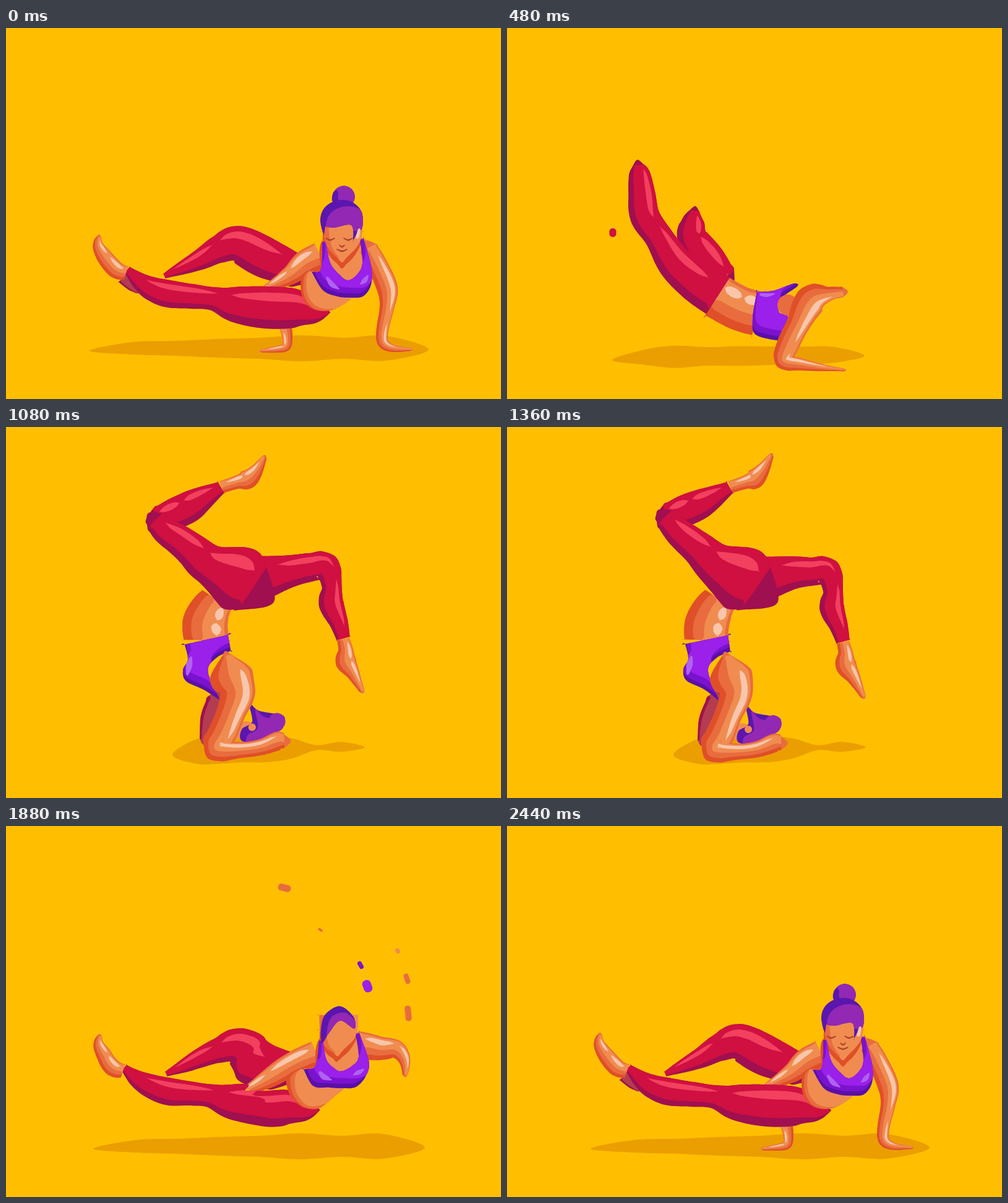
Animation, 800 px wide and 600 px high, one loop 2480 ms. Source, as an HTML page:

```html
<!DOCTYPE html>
<html lang="en">
<head>
<meta charset="utf-8">
<title>Yoga flow</title>
<style>
html, body { margin: 0; width: 100%; height: 100%; overflow: hidden; background: #ffbf00; }
svg { display: block; width: 100vw; height: 100vh; }
</style>
</head>
<body>
<svg id="stage" viewBox="0 0 800 600"></svg>
<script>
const LOOP = 2480, STEP = 40, CX = 390, CY = 330;

const INK = {
  red: '#cf1041', pink: '#f2405e', plum: '#a00f50',
  skin: '#e86c3e', peach: '#f08c50', rust: '#df4f28', shine: '#f9c6ac', far: '#b33c50', line: '#a8402c',
  violet: '#7a12ce', bright: '#9a20ea', deep: '#5a0fa8', gloss: '#af62f0', hair: '#5a16ae', mauve: '#9228b4'
};

// bands: ink and range across a limb (-1 lit edge, 1 dark edge); gloss: streaks along it;
// shifts: ink and offset of copies of a free outline, clipped to it
const LOOK = {
  legging: { base: 'plum', bands: [['red', -1.4, .58]], gloss: 'pink' },
  flesh: { base: 'skin', bands: [['rust', .6, 1.4], ['peach', -.85, .1]], gloss: 'shine' },
  far: { base: 'far', bands: [['plum', .7, 1.4]] },
  face: { base: 'peach', bands: [['skin', .7, 1.4]] },
  torso: { base: 'rust', shifts: [['skin', 4, 0], ['peach', 9, -3]] },
  bra: { base: 'deep', shifts: [['violet', 0, -7], ['bright', 5, -16]] },
  hair: { base: 'hair', shifts: [['mauve', 9, 10]] }
};

const arc = (x, y, w) => `${x - w},${y},.8 ${x},${y + 3},1.2 ${x + w},${y},.8`;

// Limb: look, ends (f flat, r round) with lit side, spine "x,y,radius".
// Free outline: look, '', "x,y" with "!" at sharp corners. Last entry: only while whole or forming.
const POSES = {
  A: [
    ['flesh', 'fr-', '452,484,10 455,503,8 452,516,7 435,520,5 413,522,2.5', 'whole'],
    ['far', 'fr+', '188,404,9 203,417,8 213,427,3', 'whole'],
    ['legging', 'fr+', '256,401,4 285,388,11 315,374,17 346,357,23 375,350,30 420,372,33 475,395,25'],
    ['flesh', 'fr-', '508,368,22 484,380,21 462,398,16 438,412,10 420,420,5'],
    ['legging', 'fr+', '196,391,6 225,416,17 258,429,22 300,434,20 335,438,19 370,447,29 420,452,34 470,454,31 500,462,16 521,460,3'],
    ['flesh', 'fr-', '194,396,11 178,391,14 160,371,13 149,352,9 150,338,4'],
    ['torso', '', '478,402 490,392 505,400 530,428 557,435 545,447 523,457 500,456 485,446 477,428'],
    ['torso', '', '510,346 543,352 578,340 584,365 590,395 570,415 530,410 510,390'],
    ['flesh', 'rr+', '586,356,14 599,380,16 616,420,17 616,450,12 609,485,10 609,508,9 625,518,6 655,520,2', 'whole'],
    ['flesh', 'fr+', '578,361,23 605,361,18 630,361,15 644,378,10 646,403,4', 'forming'],
    ['rust', 'fr+', '543,330,31 543,350,30 543,370,19 543,382,7'],
    ['bra', '', '511,346! 517,347! 524,380 540,400 553,408 568,398 576,380 572,342! 578,341! 590,385 590,415 577,434 555,436 535,434 512,424 494,394! 509,390'],
    ['gloss', 'rr+', '519,404,2 527,415,4 538,422,1'],
    ['gloss', 'rr+', '573,414,1 580,408,4 585,400,1'],
    ['face', 'fr+', '544,315,32 544,335,31 543,355,23 543,372,7'],
    ...[[524, 340, 7], [553, 340, 7], [543, 351, 4], [543, 358, 8]].map(a => ['line', 'rr+', arc(...a), 'whole']),
    ['mauve', 'rr+', '546,273,18', 'whole'],
    ['hair', 'rr+', '533,266,4 532,278,5 541,287,4', 'whole'],
    ['hair', '', '510,324 508,308 513,293 526,282 545,278 562,283 575,298 576,322 566,335 561,344! 558,319 530,323 516,321! 514,335!', 'whole'],
    ['shine', 'rr+', '571,326,2 568,338,3', 'whole'],
    ['hair', '', '516,350 514,330 522,320 546,313 568,320 570,334 546,336 528,340', 'forming']
  ],
  L: [
    ['legging', 'rr+', '303,296,8 300,314,19 300,340,25 325,375,28 350,405,22'],
    ['flesh', 'ff+', '338,433,36 375,453,36 406,462,36'],
    ['legging', 'rf+', '212,222,9 214,235,17 218,270,22 223,305,24 245,338,23 272,380,29 308,412,33 341,433,35'],
    ['bra', '', '404,427! 430,425 455,416 466,413 469,418 440,440 440,460 454,467 440,506! 402,496 397,470'],
    ['gloss', 'rr+', '410,431,2 420,432,3 432,430,1'],
    ['flesh', 'rr+', '454,448,17'],
    ['flesh', 'rr+', '543,427,8 520,430,12 492,440,25 470,480,19 453,515,18 447,538,14 475,544,10 515,550,5 546,553,2']
  ],
  B: [
    ['far', 'rr+', '338,440,14 326,475,16 316,508,8'],
    ['face', 'rr+', '380,495,16'],
    ['hair', '', '386,450 400,462 425,467 442,472 440,490 426,499 400,512 374,510 374,492 390,480'],
    ['mauve', 'rr+', '430,480,14'],
    ['peach', 'rr+', '390,489,6'],
    ['legging', 'ff+', '418,245,36 460,236,27 492,234,23 518,234,22 527,265,16 525,292,20 536,322,15 543,347,11'],
    ['flesh', 'fr+', '543,348,10 547,365,12 548,385,17 561,407,11 576,436,4'],
    ['flesh', 'fr+', '361,97,10 386,89,11 400,84,16 414,68,11 427,46,4'],
    ['flesh', 'ff+', '344,279,28 332,297,33 323,320,36 322,345,35'],
    ['legging', 'fr-', '360,98,10 318,122,23 285,136,25 258,144,19'],
    ['legging', 'rr+', '255,147,17 277,170,23 310,197,28 338,222,36 380,246,54 402,261,42'],
    ['bra', '', '288,351! 357,337! 361,363! 338,374 325,395 343,443! 318,424 290,410 285,392 293,375'],
    ['gloss', 'rr+', '298,372,2 295,385,5 292,399,2'],
    ['flesh', 'rr+', '354,371,8 361,400,34 370,430,27 358,465,22 345,497,23 334,522,20 372,525,13 405,521,13 432,511,15 443,511,11']
  ],
  R: [
    ['flesh', 'fr+', '453,468,12 430,481,11 408,491,10 392,501,3'],
    ['flesh', 'ff+', '296,272,33 340,269,35 374,274,31'],
    ['legging', 'fr-', '425,255,46 452,220,35 480,199,28 506,196,20 519,207,8'],
    ['legging', 'ff+', '371,272,31 410,269,55 455,298,45 488,346,33 498,385,31 484,423,27 453,468,12'],
    ['bra', '', '225,240 238,227 262,227 280,234 292,250 316,306! 290,305 277,320 263,379! 240,355 219,328! 226,300 222,258'],
    ['gloss', 'rr+', '233,250,2 242,238,4 266,238,2'],
    ['flesh', 'rr+', '252,338,16 235,352,29 199,383,21 186,412,12 184,438,5']
  ]
};

const parse = text => text.split(' ').map(v => v.split(',').map(parseFloat));

// Landmarks: front foot, hip, rear foot, waist, shoulder, hand
const BODY = {
  A: parse('150,345 490,465 256,400 505,430 595,360 630,518'),
  L: parse('212,225 320,405 306,293 365,440 480,430 540,553'),
  B: parse('575,430 400,245 425,50 325,310 370,380 435,515'),
  R: parse('395,497 430,260 520,205 330,265 240,325 183,435')
};

// Shift of a few points while a pose settles: x, y, dx, dy
const SETTLE = {
  A: parse('150,345,1,2 194,390,-5,0 256,400,3,0 375,325,3,7 335,455,-6,-2 400,440,0,-2 505,460,-17,0 430,406,-38,10 512,346,-5,1 575,341,-7,-6 555,436,-12,-12 543,325,-6,-22 625,370,0,0'),
  B: parse('240,145,-28,10 428,45,-19,6 361,97,-25,0 310,196,-18,5 420,235,-10,-2 535,225,-1,-16 543,347,4,-10 577,437,-1,-18 340,280,-6,1 372,370,5,-2 318,533,10,-4 446,513,13,-6 420,480,16,-7 288,400,2,2')
};

// Shadow: left, right, y at both ends, then half heights at even spacing
const SHADOW = {
  A: [135, 683, 518, 518, 10, 12, 15, 17, 21, 17, 20],
  L: [170, 578, 533, 528, 12, 18, 15, 16, 15, 14, 13],
  B: [269, 580, 526, 516, 20, 21, 20, 21, 16, 4, 8],
  R: [210, 608, 525, 518, 14, 20, 19, 19, 13, 13, 16]
};

// Drops circle with the body: ink, x, y, length, width, time there
const DROPS = [
  ['red', 171, 331, 14, 11, 480], ['plum', 216, 225, 5, 3, 800], ['peach', 416, 422, 12, 8, 800],
  ['skin', 186, 332, 13, 7, 1640], ['skin', 195, 475, 32, 14, 1640], ['skin', 225, 510, 9, 6, 1640],
  ['bright', 298, 341, 38, 26, 1640],
  ['skin', 450, 100, 21, 11, 1880], ['skin', 508, 168, 8, 4, 1880], ['violet', 573, 225, 13, 7, 1880],
  ['bright', 584, 259, 20, 14, 1880], ['peach', 633, 202, 9, 7, 1880], ['skin', 648, 247, 17, 8, 1880],
  ['skin', 650, 303, 25, 10, 1880]
];
const DROP_LIFE = 140, DROP_TURN = .1;

const cubicIn = u => u * u * u;
const cubicOut = u => 1 - cubicIn(1 - u);
// from, to, start, end, clockwise turn, easing
const MOVES = [
  ['A', 'L', 120, 480, 45, cubicIn],
  ['L', 'B', 480, 760, 95, cubicOut],
  ['B', 'R', 1360, 1640, 70, cubicIn],
  ['R', 'A', 1640, 1860, 150, cubicOut]
];

const mix = (a, b, s) => a.map((v, i) => v + (b[i] - v) * s);

// Point, radius and direction at u (0..1) along a spine
function along(spine, u) {
  const last = spine.length - 1, i = Math.min(last - 1, Math.floor(u * last)), f = u * last - i;
  const [a, b, c, d] = [i - 1, i, i + 1, i + 2].map(k => spine[Math.max(0, Math.min(last, k))]);
  const at = k => b[k] + f * (c[k] - a[k] + f * (2 * a[k] - 5 * b[k] + 4 * c[k] - d[k] + f * (3 * (b[k] - c[k]) + d[k] - a[k]))) / 2;
  const slope = k => c[k] - a[k] + f * (2 * (2 * a[k] - 5 * b[k] + 4 * c[k] - d[k]) + 3 * f * (3 * (b[k] - c[k]) + d[k] - a[k]));
  const tx = slope(0), ty = slope(1), len = Math.hypot(tx, ty) || 1;
  return { x: at(0), y: at(1), r: at(2), tx: tx / len, ty: ty / len };
}

// Ribbon between two heights across the limb; width narrows by taper(k)
function ribbon(spine, u0, u1, v0, v1, taper = () => 1) {
  const count = Math.max(6, Math.round((spine.length - 1) * 3 * (u1 - u0))), mid = (v0 + v1) / 2;
  const edge = v => Array.from({ length: count + 1 }, (_, i) => {
    const k = i / count, p = along(spine, u0 + (u1 - u0) * k), w = p.r * (mid + (v - mid) * taper(k));
    return [p.x - p.ty * w, p.y + p.tx * w];
  });
  return [edge(v0), edge(v1).reverse()];
}

function limb(look, ends, spine) {
  const side = ends[2] === '-' ? -1 : 1;
  const [a, b] = ribbon(spine, 0, 1, -1, 1);
  const cap = (u, dir, round, from, to) => {
    const p = along(spine, u);
    return round ? [[p.x + p.tx * p.r * dir, p.y + p.ty * p.r * dir]] : [from, to];
  };
  const outline = [...a, ...cap(1, 1, ends[1] === 'r', a[a.length - 1], b[0]),
    ...b, ...cap(0, -1, ends[0] === 'r', b[b.length - 1], a[0])];
  const layers = [[look.base, outline]];
  for (const [ink, v0, v1] of look.bands || []) layers.push([ink, ribbon(spine, 0, 1, v0 * side, v1 * side).flat()]);
  if (look.gloss) {
    for (const u of [.1, .53]) {
      layers.push([look.gloss, ribbon(spine, u, u + .36, -.72 * side, -.3 * side, k => Math.sin(Math.PI * k) ** .6).flat()]);
    }
  }
  return layers;
}

function disc(look, [x, y, r]) {
  const ring = Array.from({ length: 8 }, (_, i) => [x + r * Math.cos(i * Math.PI / 4), y + r * Math.sin(i * Math.PI / 4)]);
  return [[look.base, ring]];
}

function outlined(look, text) {
  const pts = text.split(' ').flatMap(v => {
    const p = v.split(',').map(parseFloat);
    return v.endsWith('!') ? [p, p] : [p];
  });
  const shifts = (look.shifts || []).map(([ink, dx, dy]) => [ink, pts.map(([x, y]) => [x + dx, y + dy])]);
  return [[look.base, pts], ...shifts];
}

function build([name, ends, text]) {
  const look = LOOK[name] || { base: name };
  if (!ends) return outlined(look, text);
  const spine = parse(text);
  return spine.length === 1 ? disc(look, spine[0]) : limb(look, ends, spine);
}

const stage = document.getElementById('stage');
function add(parent, tag, attrs = {}) {
  const node = document.createElementNS('http://www.w3.org/2000/svg', tag);
  for (const key in attrs) node.setAttribute(key, attrs[key]);
  parent.appendChild(node);
  return node;
}
const show = (node, on) => node.setAttribute('display', on ? 'inline' : 'none');

add(stage, 'rect', { width: 800, height: 600, fill: '#ffbf00' });
const shadow = add(stage, 'path', { fill: '#eb9e00' });
const drops = DROPS.map(([ink, , , w, h]) =>
  add(stage, 'rect', { x: -w / 2, y: -h / 2, width: w, height: h, rx: h * .45, fill: INK[ink] }));

let clips = 0;
const figure = {};
for (const pose in POSES) {
  const g = add(stage, 'g');
  const parts = POSES[pose].map(part => {
    const node = add(g, 'g'), id = 'clip' + clips++;
    const mask = add(add(node, 'clipPath', { id }), 'path');
    let inner = node;
    const shapes = build(part).map(([ink, points], i) => {
      const path = add(inner, 'path', { fill: INK[ink] });
      if (i === 0) inner = add(node, 'g', { 'clip-path': `url(#${id})` });
      return { points, paths: i ? [path] : [path, mask] };
    });
    return { node, shapes, stage: part[3] };
  });
  figure[pose] = { g, parts };
}

// Closed Catmull-Rom curve
function curve(pts) {
  const n = pts.length, f = v => v.toFixed(1);
  let out = `M${f(pts[0][0])} ${f(pts[0][1])}`;
  for (let i = 0; i < n; i++) {
    const a = pts[(i + n - 1) % n], b = pts[i], c = pts[(i + 1) % n], e = pts[(i + 2) % n];
    out += 'C' + [0, 1].map(k => f(b[k] + (c[k] - a[k]) / 6)).join(' ') + ' ' +
      [0, 1].map(k => f(c[k] - (e[k] - b[k]) / 6)).join(' ') + ' ' + f(c[0]) + ' ' + f(c[1]);
  }
  return out + 'Z';
}

function turn([x, y], degrees) {
  const a = degrees * Math.PI / 180, c = Math.cos(a), s = Math.sin(a);
  return [CX + (x - CX) * c - (y - CY) * s, CY + (x - CX) * s + (y - CY) * c];
}

// Shift a point by the pins around it, nearest pins weighing most
function pull([x, y], pins, amount) {
  let sum = 0, mx = 0, my = 0;
  for (const [px, py, dx, dy] of pins) {
    const w = 1 / ((x - px) ** 2 + (y - py) ** 2 + 40) ** 2;
    sum += w; mx += w * dx; my += w * dy;
  }
  return [x + amount * mx / sum, y + amount * my / sum];
}

function settling(pose, t) {
  if (pose === 'A') return t < 1640 ? 0 : Math.min(1, Math.exp((1880 - t) / 110));
  if (pose !== 'B') return 0;
  const u = Math.min(1, Math.max(0, (t - 800) / 560));
  return 1 - u * u * (3 - 2 * u);
}

function shadowPath([x0, x1, y0, y1, ...half], squeeze) {
  const n = half.length + 1, mid = (x0 + x1) / 2;
  const at = (k, h) => [mid + (x0 + (x1 - x0) * k / n - mid) * squeeze, y0 + (y1 - y0) * k / n + h];
  const top = half.map((h, i) => at(i + 1, -h)), bottom = half.map((h, i) => at(i + 1, h));
  return curve([at(0, 4), ...top, at(n, 2), ...bottom.reverse()]);
}

function draw(t) {
  const move = MOVES.find(m => t >= m[2] && t < m[3]);
  let pose = t >= 760 && t < 1360 ? 'B' : 'A', from = pose, to = pose, s = 0, angle = 0, pins = null;
  if (move) {
    const [, , start, end, sweep, ease] = move;
    [from, to] = move;
    s = ease((t - start) / (end - start));
    pose = s < .5 ? from : to;
    angle = sweep * (pose === from ? s : s - 1);
    pins = BODY[pose].map((p, i) => {
      const own = turn(p, angle);
      const goal = mix(turn(BODY[from][i], sweep * s), turn(BODY[to][i], sweep * (s - 1)), s);
      return [...own, goal[0] - own[0], goal[1] - own[1]];
    });
  }

  const loose = settling(pose, t);
  const place = p => {
    if (loose) p = pull(p, SETTLE[pose], loose);
    return pins ? pull(turn(p, angle), pins, 1) : p;
  };
  const skip = t >= 1640 && t < 1960 ? 'whole' : 'forming';
  for (const name in figure) show(figure[name].g, name === pose);
  for (const { node, shapes, stage } of figure[pose].parts) {
    show(node, stage !== skip);
    if (stage === skip) continue;
    for (const { points, paths } of shapes) {
      const d = curve(points.map(place));
      paths.forEach(path => path.setAttribute('d', d));
    }
  }

  const squeeze = pose === 'A' ? 1 - .022 * loose : 1;
  shadow.setAttribute('d', shadowPath(mix(SHADOW[from], SHADOW[to], s), squeeze));

  DROPS.forEach(([, x, y, , , at], i) => {
    const age = t - at, on = Math.abs(age) < DROP_LIFE;
    show(drops[i], on);
    if (!on) return;
    const [px, py] = turn([x, y], age * DROP_TURN);
    const tilt = Math.atan2(py - CY, px - CX) * 180 / Math.PI + 90;
    drops[i].setAttribute('transform', `translate(${px} ${py}) rotate(${tilt}) scale(${1 - Math.abs(age) / DROP_LIFE})`);
  });
}

const start = performance.now();
function tick(now) {
  const t = Math.max(0, now - start) % LOOP;
  draw(Math.floor(t / STEP) * STEP);
  requestAnimationFrame(tick);
}
draw(0);
requestAnimationFrame(tick);
</script>
</body>
</html>
```
